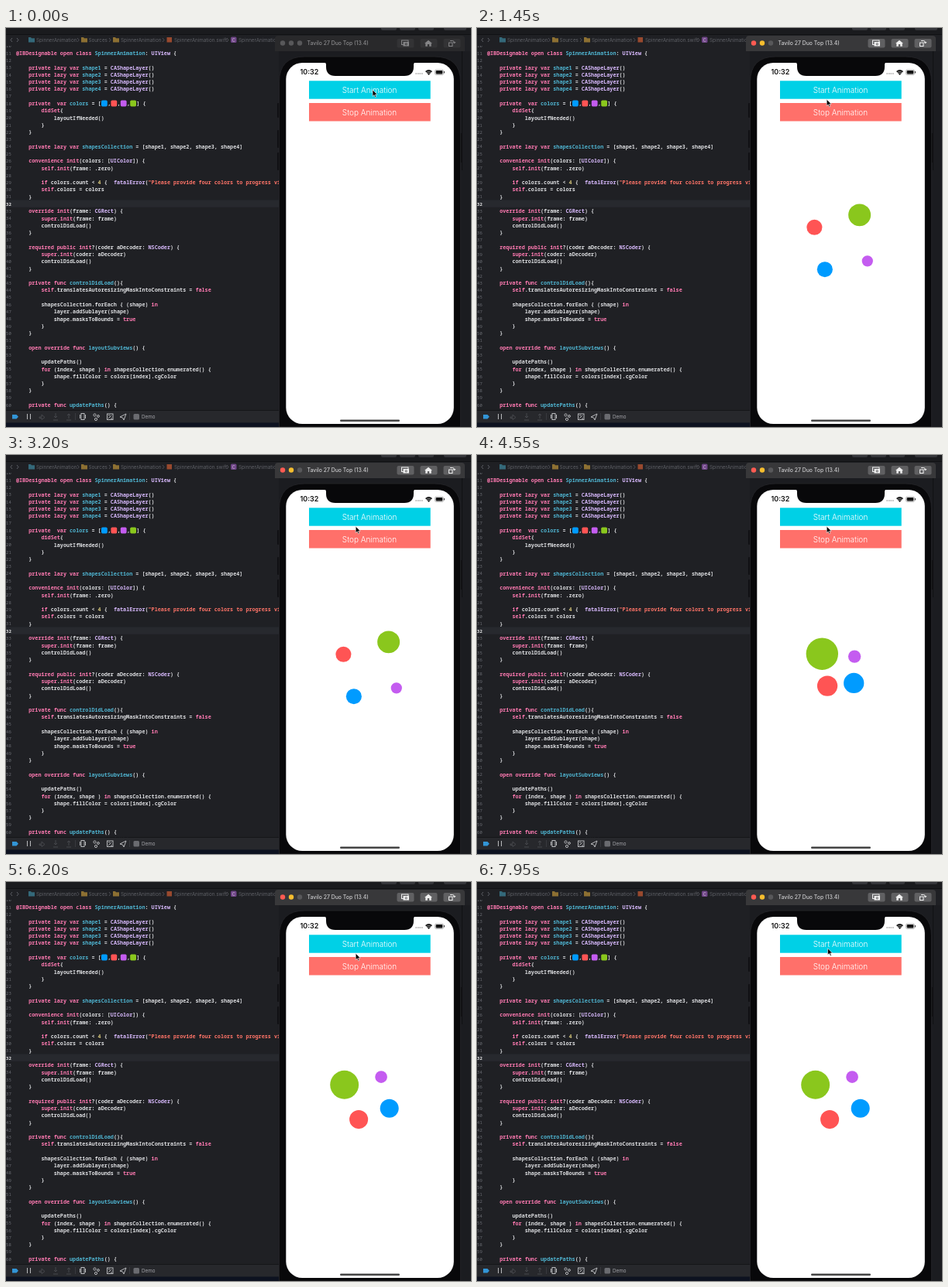
Recreate the animation shown at these times as an HTML page. Size 600 by 516 pixels, loop 8000 ms.

```html
<!DOCTYPE html>
<html lang="en">
<head>
<meta charset="utf-8">
<title>Spinner animation</title>
<style>
html, body { margin: 0; width: 100%; height: 100%; overflow: hidden; background: #1f2024; }
svg { display: block; width: 600px; height: 516px; }
text { white-space: pre; }
#code { font: 600 6.77px "Noto Sans Mono", "DejaVu Sans Mono", monospace; fill: #dcdde0; }
#numbers { font: 400 5.6px "Noto Sans Mono", monospace; fill: #6c6e75; text-anchor: end; }
.keyword { fill: #ff7ab2; font-weight: 700; }
.type { fill: #d9bafe; }
.name { fill: #4fb4d1; }
.string { fill: #ff7468; }
.number { fill: #d9c97c; }
.crumbs { font: 400 6.3px Inter, sans-serif; fill: #606268; }
.button { font: 300 10px Inter, sans-serif; fill: #fff; text-anchor: middle; }
.line { fill: none; stroke: #b8b9bc; stroke-width: 1; }
#window { --bar: #29292b; --key: #333335; --ink: #858587; --title: #8b8b8d; --red: #58585a; --yellow: #58585a; }
#window.active { --bar: #38383a; --key: #606062; --ink: #f0f0f0; --title: #cbcbcd; --red: #ff5b52; --yellow: #f6bd2e; }
</style>
</head>
<body>
<svg viewBox="0 0 600 516">
  <defs>
    <clipPath id="editor"><rect y="23" width="600" height="471.5"/></clipPath>
    <path id="folder" d="M0 0h3l1 1.2h4v5.3h-8z"/>
    <path id="chevron" d="M0 0l2 2.5l-2 2.5" fill="none" stroke="#5d5f66" stroke-width=".8"/>
  </defs>

  <rect width="600" height="516" fill="#1f2024"/>
  <rect width="600" height="8" fill="#1a1b1e"/>
  <g fill="#35363a">
    <rect x="484" y="-4" width="20" height="7" rx="2"/><rect x="508" y="-4" width="20" height="7" rx="2"/>
    <rect x="532" y="-4" width="20" height="7" rx="2"/><rect x="565" y="-4" width="29" height="7" rx="2"/>
  </g>
  <rect y="8" width="600" height="1" fill="#111214"/>

  <g class="crumbs">
    <path d="M8 13l-2 2.5l2 2.5M14 13l2 2.5l-2 2.5" fill="none" stroke="#6d6f75" stroke-width=".8"/>
    <use href="#folder" x="29" y="12" fill="#34697a"/><text x="39" y="17.8">SpinnerAnimation</text>
    <use href="#chevron" x="92" y="13"/>
    <use href="#folder" x="97" y="12" fill="#8d7032"/><text x="106.5" y="17.8">Sources</text>
    <use href="#chevron" x="133" y="13"/>
    <use href="#folder" x="138" y="12" fill="#8d7032"/><text x="148" y="17.8">SpinnerAnimation</text>
    <use href="#chevron" x="202" y="13"/>
    <rect x="207.5" y="12" width="6.5" height="6.5" fill="#98492e"/><text x="217" y="17.8">SpinnerAnimation.swift</text>
    <use href="#chevron" x="285" y="13"/>
    <rect x="290" y="11.5" width="7.5" height="7.5" rx="1.5" fill="#6f4487"/>
    <text x="291.7" y="17.5" font-size="5.5" style="fill:#d0c2d8">C</text><text x="300" y="17.8">SpinnerAnimation</text>
  </g>

  <rect y="222.5" width="354" height="9.3" fill="#27292e"/>
  <g clip-path="url(#editor)"><g id="numbers"></g><g id="code"></g></g>

  <rect y="494.5" width="600" height="16" fill="#27282c"/>
  <rect y="494" width="600" height=".8" fill="#111215"/>
  <rect y="510.5" width="600" height="5.5" fill="#0d1220"/>
  <path d="M8 500h5.500l2.500 2.700l-2.500 2.700h-5.500z" fill="#3295d6"/>
  <path d="M27.500 499v7M31.500 499v7" class="line" stroke-width="2"/>
  <g class="line" style="stroke:#47484d">
    <path d="M43 503h3v-3l4 3.500l-4 3v-2h-3z"/><path d="M64 498v6m-2-2l2 2l2-2M61 507h6"/><path d="M81 505v-6m-2 2l2-2l2 2M78 507h6"/>
  </g>
  <path d="M89.500 498v9M159.500 498v9" stroke="#3d3e43" stroke-width=".8"/>
  <g class="line">
    <rect x="97" y="498.500" width="4" height="8"/><path d="M95.500 500v5M102.500 500v5"/>
    <circle cx="114.500" cy="500.500" r="1.600"/><circle cx="119" cy="502" r="1.400"/><circle cx="116" cy="506" r="1.600"/>
    <rect x="130.500" y="499" width="7.500" height="7.500"/><path d="M132 505l4-4M132 501h2M135 505h2"/>
    <path d="M147 503l8-4l-3 8l-1.500-3z"/>
  </g>
  <rect x="164.500" y="499" width="7.500" height="7.500" rx="1.500" fill="#6a6b70"/>
  <text x="175" y="505" class="crumbs" style="fill:#a5a6ab">Demo</text>

  <rect x="352" y="30" width="248" height="486" fill="#1b1c20"/>
  <rect x="588" y="30" width="1" height="154" fill="#101114"/>
  <g fill="#101013">
    <rect x="350" y="97" width="3" height="19" rx="1"/><rect x="350" y="132" width="3" height="23" rx="1"/>
    <rect x="350" y="161" width="3" height="23" rx="1"/><rect x="585" y="136" width="4" height="38" rx="1"/>
  </g>

  <g id="window">
    <path d="M347 30v-16q0-4 4-4h237q4 0 4 4v16z" fill="var(--bar)"/>
    <circle cx="357" cy="19.5" r="3.2" fill="var(--red)"/><circle cx="368" cy="19.5" r="3.2" fill="var(--yellow)"/>
    <circle cx="379" cy="19.5" r="3.2" fill="#58585a"/>
    <text x="388.5" y="22.3" fill="var(--title)" style="font:500 6.9px Inter,sans-serif">Tavilo 27 Duo Top (13.4)</text>
    <g fill="var(--key)">
      <rect x="504.5" y="14" width="22" height="11.5" rx="2"/><rect x="534.5" y="14" width="22" height="11.5" rx="2"/><rect x="564.5" y="14" width="22" height="11.5" rx="2"/>
    </g>
    <g fill="none" stroke="var(--ink)">
      <rect x="510.500" y="16" width="8.500" height="5.500"/><rect x="513" y="18.500" width="6.500" height="4.500" fill="var(--ink)"/>
      <circle cx="516.300" cy="20.800" r="1.100" stroke="var(--key)"/>
      <path d="M540 20l5-4.200l5 4.200h-1.300v3.700h-2.500v-2.700h-2.400v2.700h-2.500v-3.700z" fill="var(--ink)" stroke="none"/>
      <rect x="571.500" y="19" width="4.500" height="4.500"/><path d="M573 16.500h3.500q2 0 2 3m-1.500-1.500l1.500 2l1.500-2"/>
    </g>
  </g>

  <path d="M352.500 516v-446q0-33 33-33h167q34 0 34 33v446z" fill="#08080a" stroke="#26262a" stroke-width=".8"/>
  <rect x="361.3" y="45" width="216.5" height="467" rx="21" fill="#fff"/>
  <path d="M410 44.5q3 0 3 3v2.500q0 12 12 12h89q12 0 12-12v-2.500q0-3 3-3z" fill="#08080a"/>
  <text x="379.500" y="60.300" fill="#111" style="font:600 9px Inter,sans-serif">10:32</text>
  <g fill="#111">
    <path d="M528.500 59h9" stroke="#999" stroke-width="1.300" stroke-dasharray="1.400 1.130"/>
    <path d="M545.500 61l-4.500-5q4.500-4 9 0z"/>
    <path d="M542 57.500q3.500-2.500 7 0M543.200 59q2.300-1.500 4.600 0" fill="none" stroke="#fff" stroke-width=".5"/>
    <rect x="553.500" y="54" width="11" height="6.500" rx="1.700" fill="none" stroke="#888" stroke-width=".6"/>
    <rect x="554.600" y="55.100" width="8.800" height="4.300" rx=".8"/><rect x="565.200" y="56" width=".8" height="2.400"/>
  </g>
  <rect x="391" y="68.3" width="156.7" height="23.4" fill="#00d0e6"/>
  <rect x="391" y="97" width="156.7" height="23.5" fill="#ff706a"/>
  <text class="button" x="469" y="83.8">Start Animation</text>
  <text class="button" x="469" y="112.5">Stop Animation</text>
  <rect x="431" y="506.6" width="77" height="2.4" rx="1.2" fill="#444"/>

  <g id="dots"></g>
  <path id="cursor" d="M0 0v8.400l2-1.800l1.400 3.100l1.400-.6l-1.400-3h2.700z" fill="#000" stroke="#fff" stroke-width=".6"/>
</svg>

<script>
const source = `

@IBDesignable open class SpinnerAnimation: UIView {

    private lazy var shape1 = CAShapeLayer()
    private lazy var shape2 = CAShapeLayer()
    private lazy var shape3 = CAShapeLayer()
    private lazy var shape4 = CAShapeLayer()

    private  var colors = [
        didSet{
            layoutIfNeeded()
        }
    }

    private lazy var shapesCollection = [shape1, shape2, shape3, shape4]

    convenience init(colors: [UIColor]) {
        self.init(frame: .zero)

        if colors.count < 4 {  fatalError("Please provide four colors to progress view")}
        self.colors = colors
    }

    override init(frame: CGRect) {
        super.init(frame: frame)
        controlDidLoad()
    }

    required public init?(coder aDecoder: NSCoder) {
        super.init(coder: aDecoder)
        controlDidLoad()
    }

    private func controlDidLoad(){
        self.translatesAutoresizingMaskIntoConstraints = false

        shapesCollection.forEach { (shape) in
            layer.addSublayer(shape)
            shape.masksToBounds = true
        }
    }

    open override func layoutSubviews() {

        updatePaths()
        for (index, shape ) in shapesCollection.enumerated() {
            shape.fillColor = colors[index].cgColor
        }
    }

    private func updatePaths() {
        let size = min(bounds.width)`.split("\n").slice(1);

const $ = id => document.getElementById(id);
function add(parent, tag, attrs, text) {
  const node = document.createElementNS("http://www.w3.org/2000/svg", tag);
  for (const key in attrs) node.setAttribute(key, attrs[key]);
  if (text) node.textContent = text;
  return parent.appendChild(node);
}

const charWidth = 4.062, lineHeight = 9.286, firstLine = 10;
const baseline = n => 35 + (n - 11) * lineHeight;
const syntax = [
  ["string", /^".*"/],
  ["keyword", /^(@IBDesignable|open|class|private|lazy|var|let|func|didSet|convenience|init|self|super|if|for|in|override|required|public|true|false)\b/],
  ["type", /^(UIView|CAShapeLayer|UIColor|CGRect|NSCoder|fatalError)\b/],
  ["number", /^\d+/],
  ["", /^(\w+|\s+|.)/]
];

source.forEach((line, i) => {
  const n = firstLine + i, y = baseline(n);
  add($("numbers"), "text", { x: 6.8, y: y - .3, style: n === 32 ? "fill:#eee;font-weight:700" : "" }, String(n));
  const indent = line.search(/\S/);
  if (indent < 0) return;
  const row = add($("code"), "text", { x: 13 + indent * charWidth, y });
  let rest = line.trim(), declares = false;
  while (rest) {
    let [kind, pattern] = syntax.find(s => s[1].test(rest));
    const token = rest.match(pattern)[0];
    if (declares && /^\w/.test(token)) { kind = "name"; declares = false; }
    if (/^(class|var|func)$/.test(token)) declares = true;
    add(row, "tspan", { class: kind }, token);
    rest = rest.slice(token.length);
  }
});

// Corner angle, colour, full-size radius and closest distance of each dot.
const dots = [
  { angle: 225, color: "#009bff", size: 13.8, near: 19.2 },
  { angle: 315, color: "#ff5454", size: 13.8, near: 22.7 },
  { angle: 135, color: "#c45cf0", size: 8.4, near: 22.7 },
  { angle: 45, color: "#8ac71d", size: 22, near: 30.5 }
];
dots.forEach((dot, i) => {
  const x = 123 + i * 12.4;
  add($("code"), "rect", { x, y: 93.6, width: 7.8, height: 7.8, rx: 1.6, fill: dot.color });
  add($("code"), "text", { x: x + 8.2, y: baseline(18) }, i < 3 ? "," : "] {");
  dot.node = add($("dots"), "circle", { fill: dot.color });
});

// cubic-bezier(.42, 0, .58, 1)
function easeInOut(x) {
  let s = x;
  for (let i = 0; i < 6; i++) {
    s -= (1.26 * s - .78 * s * s + .52 * s ** 3 - x) / (1.26 - 1.56 * s + 1.56 * s * s);
  }
  return s * s * (3 - 2 * s);
}
const mix = (a, b, p) => a + (b - a) * p;
const ramp = (t, from, to) => Math.min(1, Math.max(0, (t - from) / (to - from)));

const loop = 8000, step = 50, start = 370, half = 740, cycle = 1750;

function drawDots(t) {
  const phase = Math.max(0, t - start) % cycle;
  const first = ramp(phase, 0, half), second = ramp(phase, half, 2 * half);
  const turn = 180 * (easeInOut(first) + easeInOut(second));
  const gather = first - second;
  for (const { node, angle, size, near } of dots) {
    const a = (angle + turn) * Math.PI / 180, d = mix(61.5, near, gather);
    node.setAttribute("cx", 469.6 + d * Math.cos(a));
    node.setAttribute("cy", 279.6 + d * Math.sin(a));
    node.setAttribute("r", mix(5.6, size, gather));
  }
  $("dots").style.visibility = t < 350 ? "hidden" : "visible";
}

function draw(t) {
  drawDots(t);
  $("window").classList.toggle("active", t >= 150);
  const away = easeInOut(ramp(t, 550, 900)), back = ramp(t, 7800, 7950);
  const x = mix(473, 451.2, away) + 1.3 * back, y = mix(80, 92.3, away) - 6.5 * back;
  $("cursor").setAttribute("transform", `translate(${x} ${y})`);
}

let origin;
function tick(now) {
  origin ??= now;
  draw(Math.floor((now - origin) % loop / step) * step);
  requestAnimationFrame(tick);
}
draw(0);
requestAnimationFrame(tick);
</script>
</body>
</html>
```
